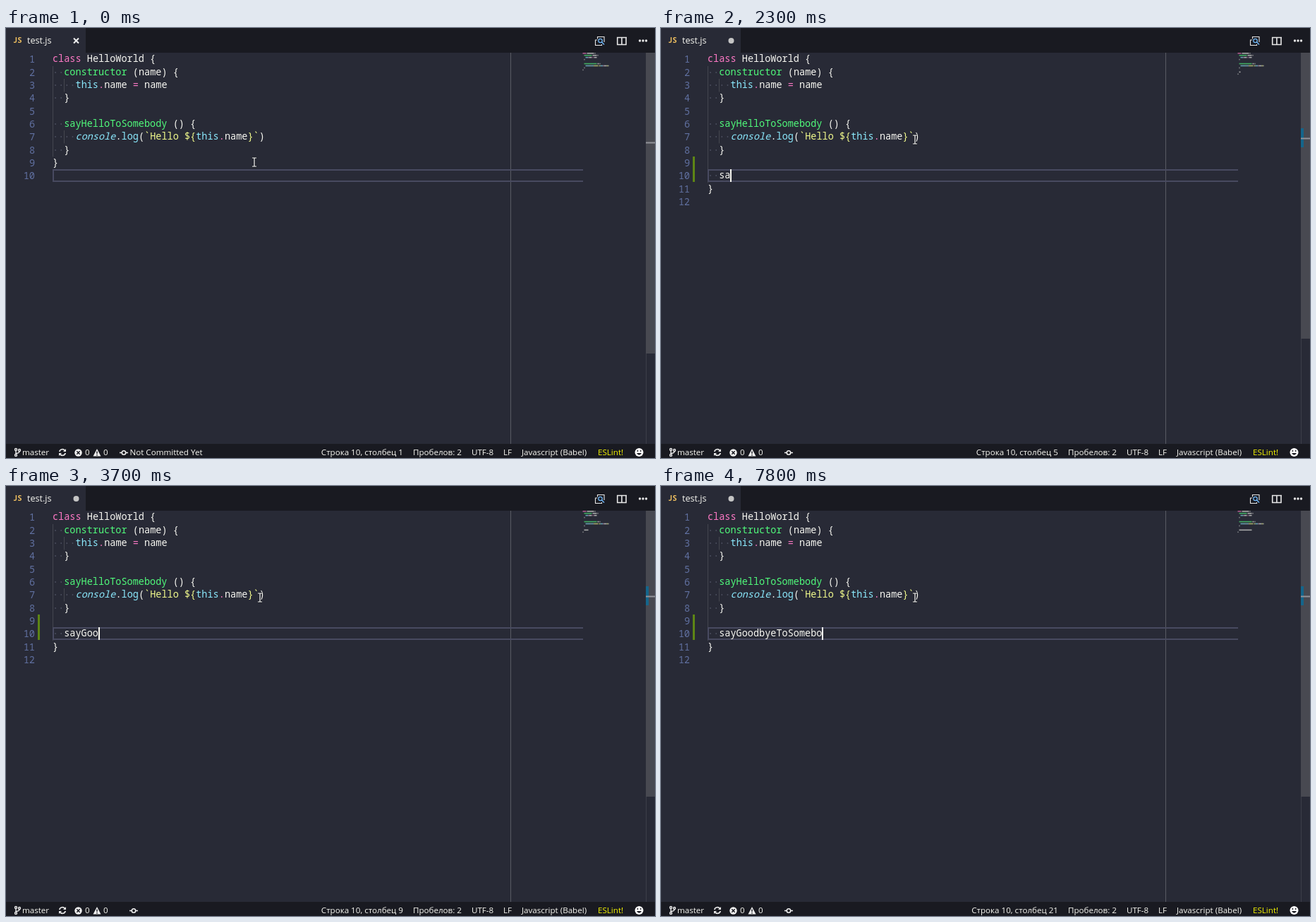
Write an HTML page that moves like this. It is 920x609 px and loops after 8000 ms.

```html
<!DOCTYPE html>
<html lang="ru">
<head>
<meta charset="utf-8">
<title>Editor</title>
<style>
  html, body { margin: 0; width: 100%; height: 100%; overflow: hidden; background: #282a36; }
  svg { display: block; width: 920px; height: 609px; }
  text { white-space: pre; }
  .code { font: 13.54px "Noto Sans Mono", monospace; font-variant-ligatures: none; }
  .ui { font: 11.6px "Open Sans", "Noto Sans", sans-serif; fill: #f8f8f2; }
  .line { fill: none; stroke: #e8e8e8; stroke-width: 1.4; }
</style>
</head>
<body>
<svg viewBox="0 0 920 609">
  <rect width="920" height="609" fill="#282a36"/>
  <rect width="920" height="35" fill="#191a21"/>
  <rect width="113" height="35" fill="#282a36"/>
  <text x="10" y="21" fill="#f0c060" style="font: bold 10.5px 'Noto Sans Mono', monospace">JS</text>
  <text class="ui" x="30" y="22" style="font-size:12.6px">test.js</text>
  <g class="line">
    <path d="M838.500 15.500V12.500H848V20M838 17H835.500V24.500H844.500V23" stroke-width="1.100"/>
    <circle cx="842.500" cy="18" r="2.700" stroke="#75beff" stroke-width="1.200"/>
    <path d="M844.500 20L848 23.500" stroke="#75beff"/>
    <path d="M866.700 13.500H879V23.500H866.700ZM872.900 13V24M866 13.500H880" stroke-width="1.600"/>
  </g>
  <g fill="#e8e8e8">
    <circle cx="898.500" cy="18" r="1.700"/><circle cx="903" cy="18" r="1.700"/><circle cx="907.500" cy="18" r="1.700"/>
  </g>
  <path d="M715.500 35V589" stroke="#585a64"/>
  <path d="M907.500 35V589" stroke="#3c3e48"/>
  <g id="scene"></g>
  <rect y="589" width="920" height="20" fill="#191a21"/>
  <g class="line">
    <circle cx="14" cy="597" r="1.500"/><circle cx="14" cy="605" r="1.500"/><circle cx="19" cy="598" r="1.500"/>
    <path d="M14 598.500V603.500M19 599.500Q19 602 14.500 602.500"/>
    <path d="M75.800 600A4.300 4.300 0 0 1 83.500 598.500M84.200 602A4.300 4.300 0 0 1 76.500 603.500" stroke-width="1.700"/>
  </g>
  <path d="M85 596V600H81ZM75 606V602H79Z" fill="#e8e8e8"/>
  <circle cx="102.500" cy="601.500" r="5.200" fill="#f0f0f0"/>
  <path d="M100.300 599.300L104.700 603.700M104.700 599.300L100.300 603.700" stroke="#191a21" stroke-width="1.500"/>
  <path d="M129 596L134.500 606.500H123.500Z" fill="#f0f0f0"/>
  <path d="M129 599.500V603M129 604V605.500" stroke="#191a21" stroke-width="1.400"/>
  <g class="ui">
    <text x="23" y="605">master</text>
    <text x="112" y="605">0</text>
    <text x="138" y="605">0</text>
    <text x="577" y="605">Пробелов: 2</text>
    <text x="660" y="605">UTF-8</text>
    <text x="705" y="605">LF</text>
    <text x="731" y="605">Javascript (Babel)</text>
    <text x="839" y="605" fill="#f5f500">ESLint!</text>
  </g>
  <circle cx="897.500" cy="601" r="6" fill="#fff"/>
  <path d="M894 602Q897.500 607.500 901 602Z" fill="#191a21"/>
  <circle cx="895.400" cy="599" r="1" fill="#191a21"/><circle cx="899.600" cy="599" r="1" fill="#191a21"/>
  <g id="position"></g>
</svg>
<script>
(() => {
const LOOP = 8000, LEFT = 66, CHAR = 8.13, PITCH = 18.35;
const COLORS = { w: '#f8f8f2', p: '#ff79c6', g: '#50fa7b', c: '#8be9fd', i: '#8be9fd', y: '#f1fa8c' };
const WORD = 'sayGoodbyeToSomebody';

const HEAD = [
  [['p', 'class'], ['w', ' HelloWorld {']],
  [['w', '  '], ['g', 'constructor'], ['w', ' (name) {']],
  [['w', '    '], ['c', 'this'], ['p', '.'], ['w', 'name '], ['p', '='], ['w', ' name']],
  [['w', '  }']],
  [],
  [['w', '  '], ['g', 'sayHelloToSomebody'], ['w', ' () {']],
  [['w', '    '], ['i', 'console'], ['w', '.'], ['c', 'log'], ['w', '('], ['y', '`Hello ${'],
    ['c', 'this'], ['p', '.'], ['w', 'name'], ['y', '}`'], ['w', ')']],
  [['w', '  }']]
];

// Brackets enclose the matched letters of each suggestion.
const SAY_LIST = ['[say]HelloToSomebody', 'M[SA]ppAs[y]ncOperation', 'M[SA]ppAs[y]ncOperationEventMap',
  'M[S]P[ay]loadBase', 'M[S]Del[ay]', 'M[S]Rel[ay]Address', 'M[SA]udioRecvPa[y]load',
  'M[SA]udioSendPa[y]load', 'M[S]Ice[A]ddrT[y]pe', 'M[S]VideoP[ay]load',
  'M[S]WebView[A]s[y]ncOperation', 'M[S]WebView[A]s[y]ncOperationEventMap'];
const KEY_LIST = ['M[S]Medi[a]Ke[y]Messa[g]eEvent'];

const key = (time, typed) => [time, { typed, col: typed + 3, caret: true, popup: null }];
const hide = time => [time, { caret: false }];

const STEPS = [
  [0, { mouse: [352, 190], line: 10, col: 1, caret: false, added: 0, typed: 0, pairs: [], popup: null,
        dirty: false, changed: false, blameX: 167, blame: 'Not Committed Yet' }],
  [100, { mouse: [354, 184] }],
  [200, { mouse: [358, 168] }],
  [300, { mouse: [360, 158] }],
  [400, { line: 7, col: 37, caret: true, pairs: [[7, 16], [7, 37]] }],
  [500, { blameX: 181, blame: 'Blame quindarel ( right now )' }],
  hide(900),
  [1200, { line: 8, col: 4, caret: true, pairs: [] }],
  [1300, { pairs: [[6, 25], [8, 3]] }],
  [1700, { line: 9, col: 3, added: 1, dirty: true, pairs: [] }],
  [1800, { line: 10, added: 2, blame: '' }],
  [2000, { changed: true }],
  key(2100, 1), key(2200, 2), key(2600, 3),
  [2700, { popup: { x: 107, rows: SAY_LIST, thumb: 82 } }],
  hide(3100), key(3200, 4),
  [3400, { popup: { x: 113, rows: KEY_LIST, thumb: 19 } }],
  key(3500, 5), key(3700, 6), key(3900, 7), hide(4400),
  key(4600, 8), hide(5100),
  key(5500, 9), key(5800, 10), key(6300, 11), key(6500, 12), hide(7000),
  key(7100, 13), key(7200, 14), key(7300, 15), key(7400, 16),
  key(7600, 17), key(7800, 18)
];
const states = [];
for (const [time, change] of STEPS) states.push({ ...states[states.length - 1], ...change, time });

const lineTop = n => Math.round(35.3 + PITCH * (n - 1));
const colX = col => LEFT + CHAR * (col - 1);
const rect = (x, y, w, h, fill, more = '') =>
  `<rect x="${x}" y="${y}" width="${w}" height="${h}" fill="${fill}" ${more}/>`;
const text = (x, y, s, fill, more = '') => `<text x="${x}" y="${y}" fill="${fill}" ${more}>${s}</text>`;
const path = (d, stroke, width = 1) => `<path d="${d}" fill="none" stroke="${stroke}" stroke-width="${width}"/>`;

function drawLine(tokens, n) {
  const y = lineTop(n), whole = tokens.map(t => t[1]).join('');
  const indent = whole.search(/\S|$/);
  let out = '', col = 1;
  for (let i = 1; i <= indent; i++) {
    out += `<circle cx="${colX(i) + CHAR / 2}" cy="${y + 9}" r=".9" fill="#4d5061"/>`;
  }
  if (indent > 2) out += rect(82, y, 1, 18.4, '#44464f');
  for (const [kind, s] of tokens) {
    const skip = s.search(/\S|$/);
    out += text(colX(col + skip), y + 13, s.slice(skip), COLORS[kind], kind === 'i' ? 'font-style="italic"' : '');
    for (const word of s.matchAll(/\S+/g)) {
      out += rect(816.5 + col + word.index, 35 + (n - 1) * 2.95, word[0].length, 1.6, COLORS[kind], 'opacity=".62"');
    }
    col += s.length;
  }
  return out;
}

function rowIcon(label, x, y) {
  if (label.startsWith('[say]')) {
    return path(`M${x - 4} ${y - 5.5}h5l3.5 3.5v8h-8.5zM${x + 1} ${y - 5.5}v3.5h3.5`, '#c5c5c5', 1.2);
  }
  if (label.includes('Ice')) {
    return path(`M${x - 2} ${y - 2}L${x + 4} ${y - 1}M${x} ${y}V${y + 4}H${x + 4}`, '#e8ab53', 1.2) +
      [[-5, -4, 6], [2, -2, 4], [2, 2, 4]].map(([dx, dy, s]) => rect(x + dx, y + dy, s, s, '#e8ab53', 'rx="1.5"')).join('');
  }
  return `<circle cx="${x - 3.5}" cy="${y}" r="2.7" fill="#75beff"/>` + path(`M${x - 2} ${y}H${x + 2}`, '#75beff', 1.5) +
    `<circle cx="${x + 3.8}" cy="${y}" r="2.1" fill="none" stroke="#75beff" stroke-width="1.4"/>`;
}

function drawPopup({ x, rows, thumb }) {
  const height = rows.length * PITCH + 1;
  let out = rect(x, 218.5, 424, height, '#21222c', 'stroke="#41434e"') + rect(x + 1, 219, 423, 18.5, '#44475a');
  rows.forEach((label, i) => {
    const y = 228.5 + i * PITCH;
    const spans = label.split(/[\[\]]/).map((s, j) =>
      j % 2 ? `<tspan fill="${COLORS.c}" font-weight="bold">${s}</tspan>` : s).join('');
    out += rowIcon(label, x + 9.5, y) + text(x + 20, y + 4.5, spans, COLORS.w);
  });
  return out + rect(x + 414, 219, 10, thumb, '#55565f');
}

function drawScroll(s) {
  const step = [14.06, 13.75, 13.45][s.added], height = [426, 415, 405][s.added];
  const mark = Math.round(35 + (s.line - 1) * step);
  return rect(907, 35, 13, height, '#484951') +
    (s.changed ? rect(907, 142, 4, 27, '#14658b') : '') +
    rect(907, mark - 0.5, 13, 2, '#92939a');
}

function drawScene(s) {
  const added = [[], [[]], [[], [['w', '  ' + WORD.slice(0, s.typed)]]]][s.added];
  const lines = [...HEAD, ...added, [['w', '}']], []];
  const y = lineTop(s.line), [mx, my] = s.mouse;
  let out = rect(66, lineTop(2), 1, PITCH * (7 + s.added), '#44464f');
  out += path(`M818 ${y + 1}H67V${y + 17}H818`, '#484a60', 2);
  for (const [line, col] of s.pairs) {
    out += rect(colX(col) + 0.5, lineTop(line) + 0.5, 8, 17, '#303d3b', 'stroke="#888"');
  }
  lines.forEach((tokens, i) => {
    out += text(41, lineTop(i + 1) + 14, i + 1, '#6070a0', 'text-anchor="end"') + drawLine(tokens, i + 1);
  });
  if (s.changed) out += rect(45, lineTop(9), 3, 36, '#5d8515');
  if (s.caret) out += rect(Math.floor(colX(s.col)), y, 2, 18, '#f8f8f0');
  out += drawScroll(s);
  out += s.dirty ? '<circle cx="99.5" cy="18" r="4" fill="#c5c5c5"/>'
    : path('M96 14.5L103 21.5M103 14.5L96 21.5', '#f0f0f0', 2);
  if (s.popup) out += drawPopup(s.popup);
  const beam = `M${mx - 3} ${my - 6}H${mx + 3}M${mx} ${my - 6}V${my + 6}M${mx - 3} ${my + 6}H${mx + 3}`;
  return `<g class="code">${out}${path(beam, '#191a21', 3)}${path(beam, '#fff', 1.2)}</g>`;
}

function drawPosition(s) {
  const x = s.blameX;
  return path(`M${x - 6} 601.5H${x - 3}M${x + 3} 601.5H${x + 6}`, '#f0f0f0', 1.7) +
    `<circle cx="${x}" cy="601.5" r="2.7" fill="none" stroke="#f0f0f0" stroke-width="1.6"/>` +
    `<g class="ui">${text(x + 8.5, 605, s.blame, '#f8f8f2')}` +
    text(563, 605, `Строка ${s.line}, столбец ${s.col}`, '#f8f8f2', 'text-anchor="end"') + '</g>';
}

const scene = document.getElementById('scene'), position = document.getElementById('position');
const start = performance.now();
let shown = null;

function frame() {
  const time = (performance.now() - start) % LOOP;
  const state = states.filter(s => s.time <= time).pop();
  if (state !== shown) {
    scene.innerHTML = drawScene(state);
    position.innerHTML = drawPosition(state);
    shown = state;
  }
  requestAnimationFrame(frame);
}
frame();
})();
</script>
</body>
</html>
```
